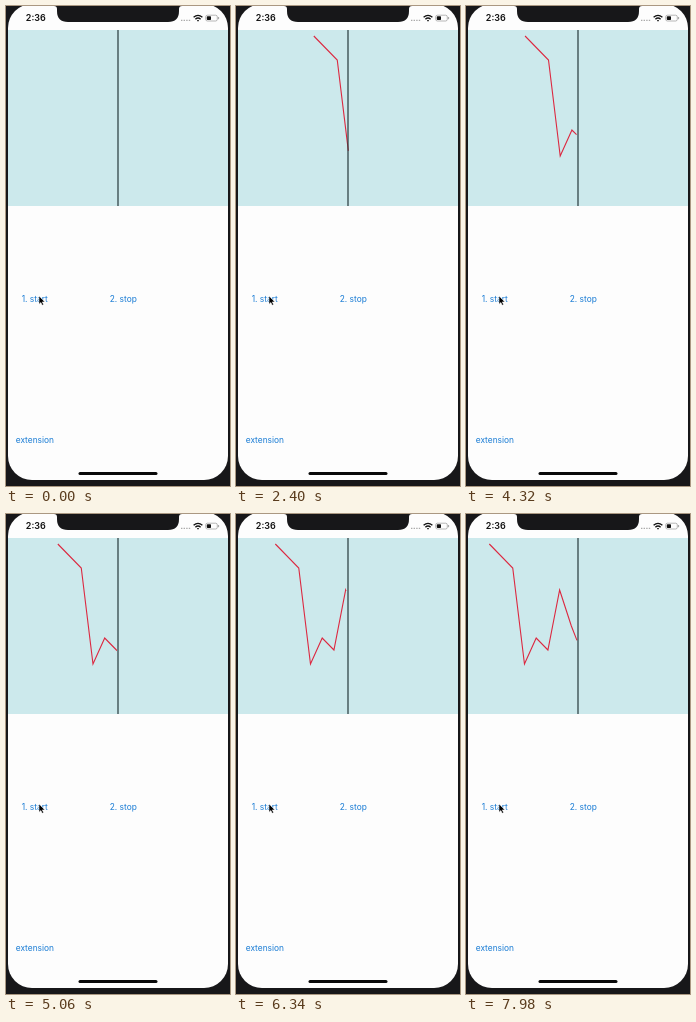
An HTML page that plays this animation: 224 px wide and 480 px high, repeating every 8000 ms.

```html
<!DOCTYPE html>
<html lang="en">
<head>
<meta charset="utf-8">
<title>Scrolling line chart</title>
<style>
  html, body { margin: 0; width: 100%; height: 100%; overflow: hidden; background: #171719; }
  svg { display: block; width: 224px; height: 480px; }
  text { font: 400 8.4px Inter, sans-serif; fill: #187bd4; }
  .clock { font-weight: 600; font-size: 9px; fill: #111; }
</style>
</head>
<body>
<svg viewBox="0 0 224 480">
  <rect x="2" y="-2" width="220" height="476" rx="24" fill="#fdfdfd"/>
  <rect x="2" y="24" width="220" height="176" fill="#cce9ec"/>
  <polyline id="graph" fill="none" stroke="#dc2840" stroke-width="1.1"/>
  <path d="M112 24V200" stroke="#26383b" stroke-width="1.2"/>

  <path d="M48 0Q51 0 51 3V5Q51 16 62 16H162Q173 16 173 5V3Q173 0 176 0Z" fill="#171719"/>
  <text class="clock" x="19.8" y="15.2">2:36</text>
  <path d="M175 14.4h10" stroke="#aaa" stroke-width="1.4" stroke-dasharray="1.4 1.2"/>
  <g fill="none" stroke="#111" stroke-width="1.4">
    <path d="M187.6 11.2Q192 7.6 196.4 11.2M189.4 13.2Q192 11 194.6 13.2"/>
    <path d="M191.2 14.6h1.6"/>
  </g>
  <rect x="199.7" y="9.2" width="11.6" height="5.8" rx="1.7" fill="none" stroke="#999" stroke-width=".7"/>
  <rect x="200.8" y="10.3" width="4.2" height="3.6" rx=".7" fill="#111"/>
  <path d="M212.6 11v2.2" stroke="#999" stroke-width=".9"/>

  <text x="15.7" y="295.8">1. start</text>
  <text x="103.7" y="295.8">2. stop</text>
  <text x="9.7" y="436.8">extension</text>
  <path d="M33 290V298.2L34.9 296.5L36.2 299.3L37.6 298.6L36.3 295.9H38.8Z" fill="#000" stroke="#fff" stroke-width=".5"/>
  <rect x="72.5" y="466" width="79" height="3" rx="1.5" fill="#080808"/>
</svg>
<script>
  const LOOP = 8000, START = 195, SEGMENT = 1200, STEP = 11.72;
  // Each point is [horizontal steps from the first point, y].
  const points = [[0, 30], [2, 54], [3, 150], [4, 124], [5, 136], [6, 76], [7, 112], [8, 142]];
  const graph = document.getElementById('graph');

  // Ease-in-out: cubic Bezier (.42, 0, .58, 1), solved for x by bisection.
  function ease(x) {
    let low = 0, high = 1;
    for (let i = 0; i < 20; i++) {
      const s = (low + high) / 2;
      const bx = 3 * s * (1 - s) * (0.42 * (1 - s) + 0.58 * s) + s ** 3;
      if (bx < x) low = s; else high = s;
    }
    return low * low * (3 - 2 * low);
  }

  function draw(t) {
    const progress = (t - START) / SEGMENT;
    if (progress < 0) {
      graph.setAttribute('points', '');
      return;
    }
    const index = Math.floor(progress);
    const part = ease(progress - index);
    const from = points[index], to = points[index + 1];
    const tip = from.map((v, i) => v + (to[i] - v) * part);
    const left = 91 - (t - 1050) * STEP / SEGMENT;
    graph.setAttribute('points', [...points.slice(0, index + 1), tip]
      .map(([x, y]) => `${left + x * STEP},${y}`).join(' '));
  }

  const origin = performance.now();
  function frame() {
    draw((performance.now() - origin) % LOOP);
    requestAnimationFrame(frame);
  }
  frame();
</script>
</body>
</html>
```
